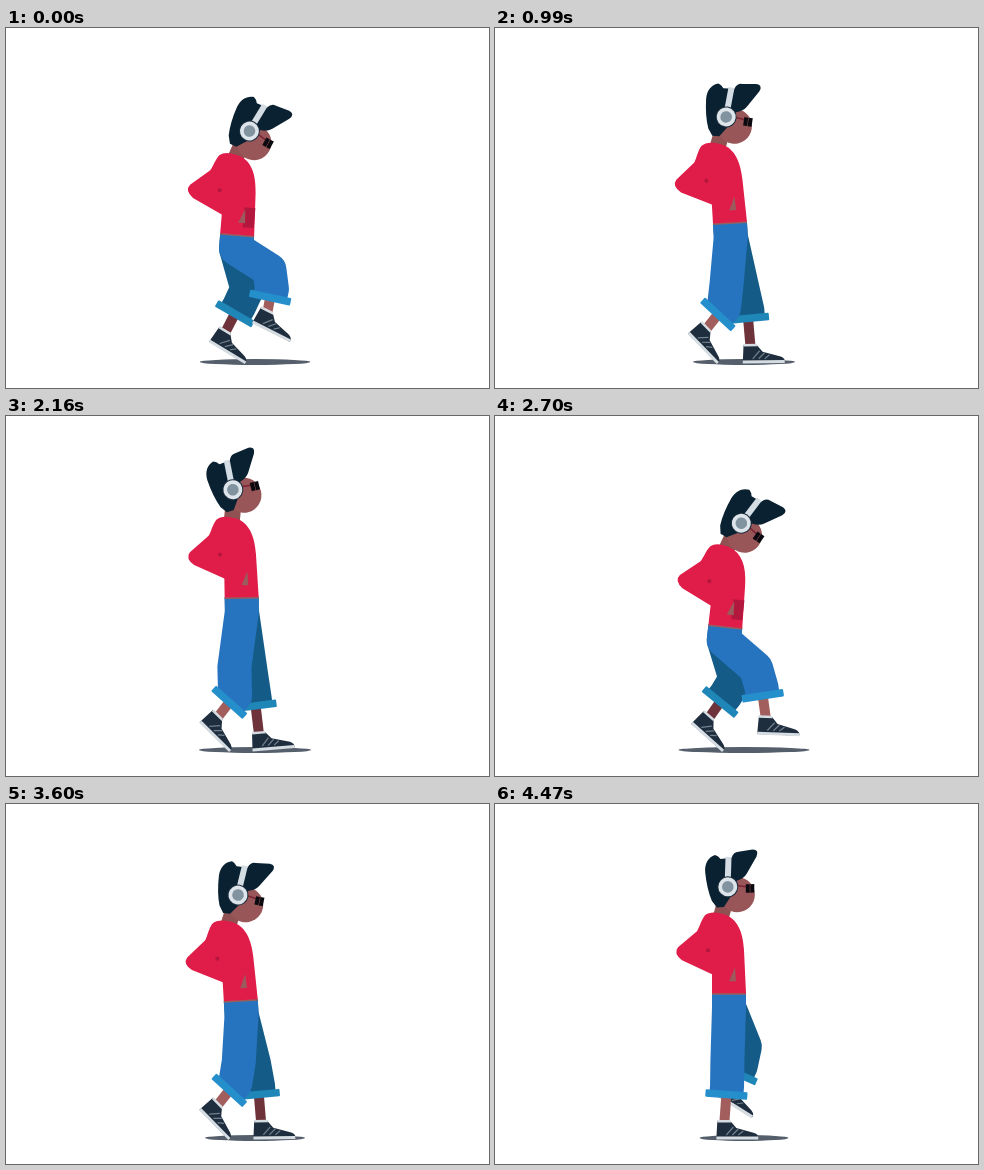
Recreate the animation shown at these times as an HTML page. Size 483 px wide and 360 px high, loop 4500 ms.

```html
<!DOCTYPE html>
<html lang="en">
<head>
<meta charset="utf-8">
<title>Walker</title>
<style>
html, body { margin: 0; width: 100%; height: 100%; overflow: hidden; background: #fff; }
svg { display: block; width: 100vw; height: 100vh; }
</style>
</head>
<body>
<svg viewBox="0 0 483 360">
  <defs>
    <g id="shoe">
      <path d="M-7 0L6 0L12 7L30 12Q35 14 34 18L-8 18Z" fill="#1f2e3e"/>
      <path d="M-7 -1L6 -1L7 1.5L-7 1.5Z M-8 15.5L34 15.5L34 18.5L-8 18.5Z" fill="#d5dce2"/>
      <path d="M2 14L9 6M8 14L14 8M14 14L19 10" stroke="#73818e" stroke-width="1.2"/>
    </g>
  </defs>
  <ellipse id="shadow" cx="249" cy="334" ry="3" fill="#555e6b"/>
  <g id="far"></g>
  <g id="near"></g>
  <path id="neck" stroke="#8f5152" stroke-width="16"/>
  <g id="torso">
    <path d="M-17 1.5L17 1.5" stroke="#93605f" stroke-width="2"/>
    <path fill="#e01c49" d="M-24 -77C-28 -72 -29 -66 -32 -61L-51 -45Q-56 -39 -47 -32L-17 -18L-17 1L17 1L15 -42C14 -61 8 -74 -5 -78Q-18 -82 -24 -77Z"/>
    <circle cx="-21" cy="-42" r="2" fill="#b3173d"/>
    <rect id="pocket" x="5" y="-27" width="11" height="20" fill="#b3173d"/>
    <path d="M0 -11L6 -25L7 -11Z" fill="#9c5a5c"/>
  </g>
  <g id="head">
    <circle cx="9.5" cy="8" r="17.5" fill="#985658"/>
    <path fill="#0a2131" d="M-4 20L-11 20.5L-16 14Q-21 2 -22.5 -15C-23 -24 -19 -30 -12.5 -32Q-9 -31 -7 -28L4 -29Q6 -35 11 -35L25 -37Q32 -37 29 -30L19 -13Q16 -8 9 -6L4 8Z"/>
    <path d="M10 -1L19 0" stroke="#7d2434" stroke-width="1.5"/>
    <path fill="#0a0a10" d="M18 -2.5h4v8.5h-4z M22.5 -2.5h4v8.5h-4z"/>
    <path d="M0 -6L1 -30" stroke="#d5dde4" stroke-width="6"/>
    <circle r="10.5" fill="#1d2e3d"/>
    <circle r="9.5" fill="#dde4ea"/>
    <circle r="5.8" fill="#8293a0"/>
  </g>
</svg>
<script>
const LOOP = 4500, STRIDE = 1296, FAR_SHIFT = 670, GROUND = 335;
const $ = id => document.getElementById(id);
const wave = (t, peak, period) => Math.cos(2 * Math.PI * (t - peak) / period);
const rad = deg => deg * Math.PI / 180;
const place = (x, y, a) => `translate(${x} ${y}) rotate(${a})`;

// Point (u, v) of a frame that is turned by a degrees around (x, y)
function turn(x, y, a, u, v) {
  const s = Math.sin(rad(a)), c = Math.cos(rad(a));
  return [x + u * c - v * s, y + u * s + v * c];
}

// One step: time, forward reach, foot tilt
const STEP = [
  [0, 42, 27], [110, 47, 2], [170, 56, -7], [335, 55, -1],
  [585, 19, 0], [700, 4, 38], [970, -1, 46], [1240, 25, 33]
];

// Periodic monotone cubic through one column of the step
function follow(col, t) {
  const n = STEP.length;
  const val = i => STEP[(i + n) % n][col];
  const time = i => STEP[(i + n) % n][0] + STRIDE * Math.floor(i / n);
  const slope = i => (val(i + 1) - val(i)) / (time(i + 1) - time(i));
  const tangent = i => {
    const a = slope(i - 1), b = slope(i);
    return a * b <= 0 ? 0 : 2 * a * b / (a + b);
  };
  let i = n - 1;
  while (time(i) > t) i--;
  const span = time(i + 1) - time(i), u = (t - time(i)) / span;
  const d = val(i + 1) - val(i), m = tangent(i) * span, k = tangent(i + 1) * span;
  return val(i) + u * (m + u * (3 * d - 2 * m - k + u * (m + k - 2 * d)));
}

// Ankle and cuff: the toe or heel rests on the ground unless the foot is lifted
function footPose(t, sway) {
  const x = 212 + follow(1, t) * (1 + 0.27 * sway);
  const tilt = follow(2, t);
  const swing = ((t - 1020 + STRIDE) % STRIDE) / 510;
  const lift = swing < 1 ? 22 * Math.sin(Math.PI * swing) : 0;
  const sole = Math.max(turn(0, 0, tilt, 33, 18)[1], turn(0, 0, tilt, -8, 18)[1]);
  const y = GROUND - sole - lift;
  const shin = 0.7 * tilt - 0.35 * (x - 242);
  const length = 27 - 0.33 * (316 - y) - 0.08 * tilt;
  const [cx, cy] = turn(x, y, shin, 0, -length);
  return { x, y, tilt, shin, cx, cy };
}

function buildLeg(id, cloth, hem, skin) {
  $(id).innerHTML =
    `<path stroke="${skin}" stroke-width="10"/>
     <use href="#shoe"/>
     <path fill="none" stroke="${cloth}" stroke-width="34" stroke-linejoin="round"/>
     <rect x="-21" y="-3" width="42" height="7.5" rx="1" fill="${hem}"/>`;
  const [calf, shoe, pants, cuff] = $(id).children;
  return (waist, hip, { x, y, tilt, shin, cx, cy }) => {
    const dx = cx - hip[0], dy = cy - hip[1], d = Math.hypot(dx, dy);
    const bend = Math.max(0, 0.6 * (84 - d));
    const knee = [hip[0] + 0.62 * dx + bend * dy / d, hip[1] + 0.62 * dy - bend * dx / d];
    const opening = turn(cx, cy, shin, 0, -8);
    calf.setAttribute("d", `M${cx} ${cy}L${x} ${y + 2}`);
    shoe.setAttribute("transform", place(x, y, tilt));
    pants.setAttribute("d", `M${waist}L${hip}L${knee}L${opening}L${cx} ${cy}`);
    cuff.setAttribute("transform", place(cx, cy, shin));
  };
}

const drawFar = buildLeg("far", "#145c87", "#1f87b8", "#6e323b");
const drawNear = buildLeg("near", "#2674bf", "#258fcb", "#a15e5d");

function draw(ms) {
  const t = ms % LOOP % STRIDE;
  const sway = wave(t, 180, STRIDE);
  const dip = (1 - wave(t, 220, STRIDE / 4)) / 2;

  const x = 233 - 2.7 * sway;
  const y = 190.4 + 10.3 * sway + 12 * dip;
  const lean = 1 + sway * (2 + 5 * dip);
  const waist = turn(x, y, lean, 0, 1), hip = turn(x, y, lean, 0, 15);
  drawFar(waist, hip, footPose((t + FAR_SHIFT) % STRIDE, sway));
  drawNear(waist, hip, footPose(t, sway));

  const tilt = 3.2 + 17.2 * sway + 20 * dip;
  const cupX = x + 3 + 12 * sway + 2 * dip;
  const cupY = y - 105.3 + 0.09 * tilt;
  $("neck").setAttribute("d", `M${turn(cupX, cupY, tilt, -1, 9)}L${turn(x, y, lean, -9, -72)}`);
  $("torso").setAttribute("transform", place(x, y, lean));
  $("head").setAttribute("transform", place(cupX, cupY, tilt));
  $("pocket").setAttribute("opacity", Math.min(1, Math.max(0, (lean - 1) / 3)));
  $("shadow").setAttribute("rx", 54 + 6.5 * sway + 8.5 * wave(t, 200, STRIDE / 2));
}

function tick(now) {
  draw(now);
  requestAnimationFrame(tick);
}
draw(0);
requestAnimationFrame(tick);
</script>
</body>
</html>
```
